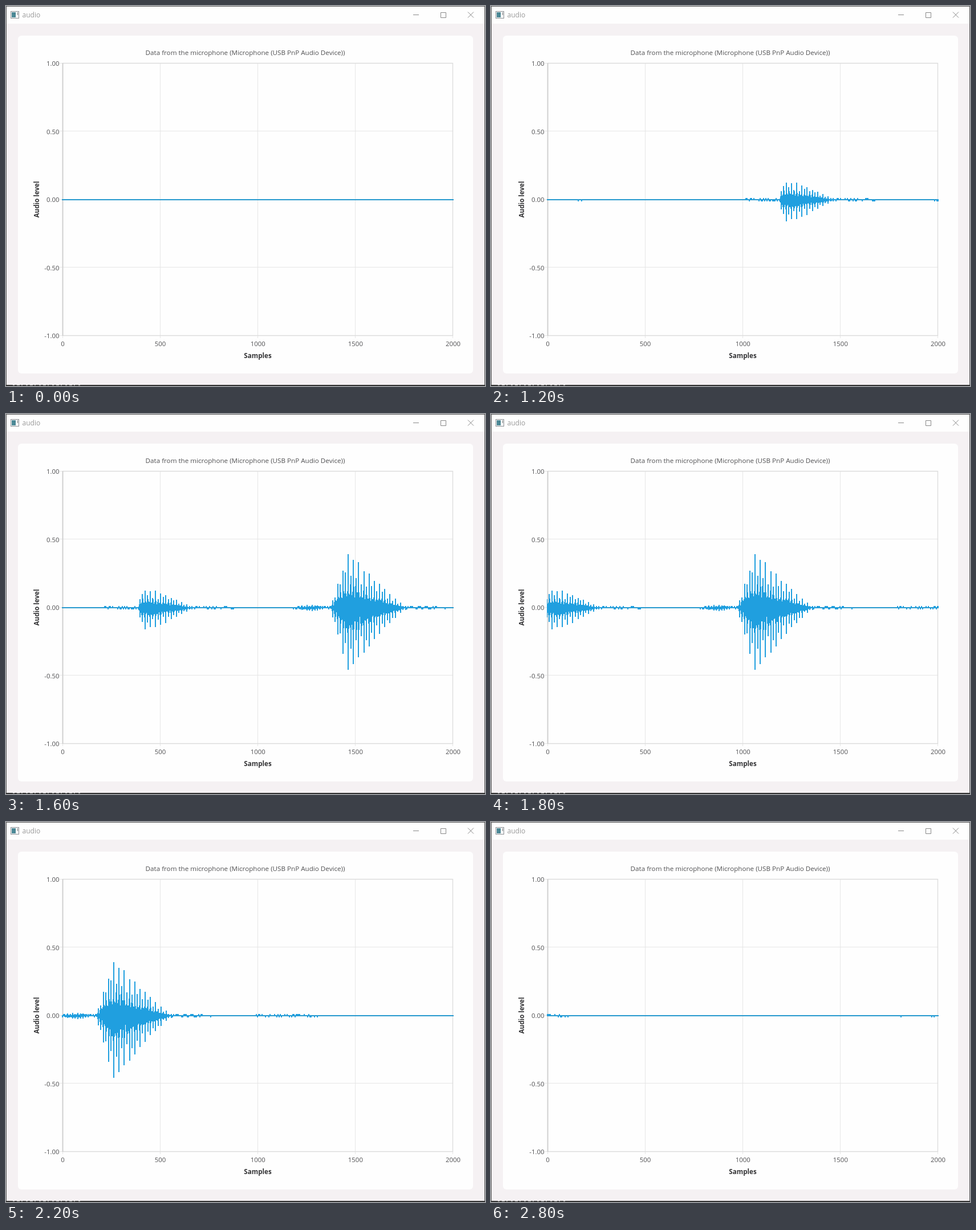
These frames come from a looping animation (840 by 667 pixels, 3 s). An HTML page:

```html
<!DOCTYPE html>
<html lang="en">
<head>
<meta charset="utf-8">
<title>audio</title>
<style>
  html, body { margin: 0; width: 100%; height: 100%; overflow: hidden; background: #f5f1f3; }
  svg { display: block; width: 840px; height: 667px; }
  text { font: 11.65px "Open Sans", "Noto Sans", sans-serif; fill: #515153; }
  .tick { font-size: 11.4px; }
  .axis { font-weight: 700; fill: #353537; }
  .caption { font-size: 12px; fill: #999; }

  /* One chunk of 137px arrives every 200 ms; every fifth chunk lags a little. */
  #wave {
    fill: none; stroke: #209fdf; stroke-width: 2; shape-rendering: crispEdges;
    animation: scroll 3s steps(15, end) -1ms infinite;
  }
  #lag { animation: lag 1s step-end -1ms infinite; }
  @keyframes scroll {
    from { transform: translateX(822px); }
    to { transform: translateX(-1233px); }
  }
  @keyframes lag {
    0% { transform: translateX(6px); }
    20%, 100% { transform: none; }
  }
</style>
</head>
<body>
<svg viewBox="0 0 840 667">
  <clipPath id="plot"><rect x="98" y="99" width="687" height="480"/></clipPath>

  <!-- window -->
  <rect width="840" height="667" fill="#f5f1f3"/>
  <rect width="840" height="31" fill="#fefefe"/>
  <path d="M0 .5H840M.5 0V667M839.5 0V667" stroke="#555" fill="none"/>
  <path d="M0 666H840" stroke="#333" stroke-width="2"/>
  <path d="M12 665.5H130" stroke="#bbb" stroke-dasharray="3 4 5 3 2 6"/>
  <rect x="8.5" y="9.5" width="14" height="12" fill="#fafafa" stroke="#8b8f94"/>
  <rect x="10" y="11" width="7" height="9" fill="#4a8795"/>
  <path d="M20.5 11V16" stroke="#777"/>
  <text class="caption" x="28.5" y="20">audio</text>
  <path d="M714 15.5H724M762.5 11.5h9v9h-9zM810 10.5l10 10m0-10l-10 10" stroke="#888" fill="none"/>

  <!-- chart -->
  <rect x="21" y="52" width="798" height="593" rx="6" fill="#fefefe"/>
  <g id="grid"></g>
  <text x="419.5" y="85.5" text-anchor="middle">Data from the microphone (Microphone (USB PnP Audio Device))</text>
  <text class="axis" x="441.5" y="618" text-anchor="middle">Samples</text>
  <text class="axis" transform="translate(58 339.5) rotate(-90)" text-anchor="middle">Audio level</text>
  <g clip-path="url(#plot)">
    <path d="M98 340H785" stroke="#2699ce" stroke-width="2"/>
    <g id="lag"><path id="wave"/></g>
  </g>
</svg>
<script>
const LEFT = 99, RIGHT = 783.5, TOP = 100, BOTTOM = 578, ZERO = 340;
const PITCH = 4.58;

function drawGrid() {
  const line = (d, color, width = 1) =>
    `<path d="${d}" stroke="${color}" stroke-width="${width}" fill="none"/>`;
  let lines = '', labels = '';
  for (let i = 0; i < 5; i++) {
    const x = LEFT + (RIGHT - LEFT) * i / 4;
    const y = TOP + (BOTTOM - TOP) * i / 4;
    const gx = Math.floor(x) + .5, gy = Math.floor(y) + .5;
    lines += line(`M${gx} ${TOP}V${BOTTOM + 5}`, '#e6e6e6');
    lines += line(`M94 ${gy}H${RIGHT}`, '#e6e6e6');
    labels += `<text class="tick" x="${x + .5}" y="597" text-anchor="middle">${i * 500}</text>`;
    labels += `<text class="tick" x="93.5" y="${y + 5}" text-anchor="end">${(1 - i / 2).toFixed(2)}</text>`;
  }
  lines += line(`M${LEFT} 100.5H${RIGHT}V578.5H${LEFT}`, '#dcdcdc', 1.3);
  lines += line(`M99.5 ${TOP}V${BOTTOM + 1}`, '#cfcfcf', 2);
  document.getElementById('grid').innerHTML = lines + labels;
}

let seed = 11;
const random = () => (seed = seed * 16807 % 2147483647) / 2147483647;
const bar = (x, up, down) =>
  `M${Math.round(x)} ${Math.round(ZERO - up)}V${Math.round(ZERO + down)}`;

// A spoken sound: linear attack, cosine decay, and a pulse at every pitch period.
function burst(start, length, attack, height) {
  const envelope = t => height * Math.min(1, t / attack) * Math.cos(t / length * Math.PI / 2) ** 1.6;
  const swing = (t, gain) =>
    bar(start + t, .9 * envelope(t) * gain(), 1.05 * envelope(t) * gain());
  let path = '';
  for (let t = 0; t < length; t++) {
    const pulse = Math.abs(Math.cos(t / PITCH * Math.PI));
    path += swing(t, () => .5 * (.4 + .6 * pulse) * (.5 + .5 * random()));
  }
  for (let n = 1; n * PITCH < length; n++) {
    path += swing(n * PITCH, n % 2 ? () => .85 + .15 * random() : () => .5 + .25 * random());
  }
  return path;
}

// Background noise that flickers one level above or below zero.
function murmur(from, to, density) {
  let path = '';
  for (let x = from; x <= to; x += 2) {
    if (random() > density) continue;
    path += random() < .5 ? bar(x, 3, 0) : bar(x, 0, 3);
  }
  return path;
}

const clicks = [153, 159, 778, 1044, 1231, 1815, 1869, 1873];

document.getElementById('wave').setAttribute('d', [
  ...clicks.map(x => bar(x, 0, 3)),
  murmur(447, 461, .5),
  murmur(470, 503, .95),
  burst(504, 112, 10, 40),
  murmur(605, 676, .65),
  burst(779, 72, 35, 11),
  burst(842, 144, 31, 115),
  murmur(782, 850, .8),
  murmur(975, 1030, .8),
  murmur(1122, 1226, .5)
].join(''));

drawGrid();
</script>
</body>
</html>
```
